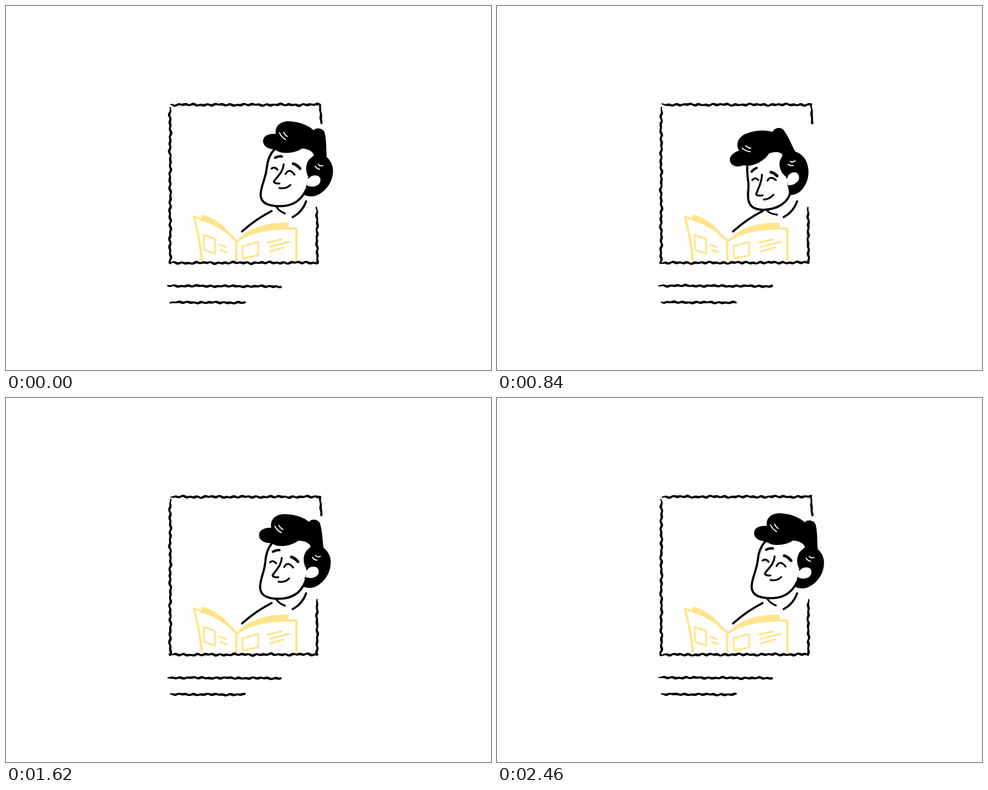
Write an HTML page with a canvas that moves like this. It is 800x600 px and loops after 2.52 s.

```html
<!DOCTYPE html>
<html lang="en">
<head>
<meta charset="utf-8">
<title>Reading</title>
<style>
html, body { margin: 0; width: 100%; height: 100%; overflow: hidden; background: #fefefe; }
canvas { display: block; width: 800px; height: 600px; }
</style>
</head>
<body>
<canvas id="stage" width="800" height="600"></canvas>
<script>
const ctx = document.getElementById('stage').getContext('2d');
const LOOP = 2520, PAPER = '#fefefe', INK = '#000', GOLD = '#ffe48c';
const PIVOT = [488, 334], TILT = -23.5 * Math.PI / 180;

// Hand-drawn border strokes: x1, y1, x2, y2, wobble
const BORDER = [
  [272, 163, 518, 163, 1],
  [518, 163, 520, 193, .4],
  [271, 167, 271, 424, 1],
  [513, 332, 513.5, 423, .8],
  [269, 423.5, 513, 423, 1],
  [267, 461, 453, 462, .8],
  [271, 488.5, 394, 489, .8]
];

const BOOK_FILL = new Path2D(
  'M322 344 C342 348 356 357 381 387 C362 370 346 360 322 354 Z ' +
  'M381 387 C400 365 430 357 466 357 L466 366 C432 366 410 370 381 387 Z');
const BOOK_LINES = new Path2D(
  'M323 420 C321 395 316 370 310 347.5 L324 352 C346 359 364 371 380 387.5 L379.5 420 ' +
  'M381 387.5 C402 371 440 365 479 367 L479 420');
const BOOK_PRINT = new Path2D(
  'M326 377 L345 384 L345 408 L327 402 Z M352 393 L363 398 M354 402 L365 406 ' +
  'M390 396 L416 389 L416 411 L391 416 Z ' +
  'M432 390 L454 385 M435 397 L467 389 M435 405 L458 398');
const SHOULDERS = new Path2D('M389.5 371.5 Q411 352 438 338 M495 322 C491 334 484 342 473 348');

const HAIR = new Path2D(
  'M441 236 C432 236 424 230 424 223 C424 214 433 210 445 211 ' +
  'C443 199 452 189 468 190 C486 191 500 198 508 205 C510 201 520 200 525 207 ' +
  'C529 219 528 238 529 249 C537 256 541 267 539 277 C537 295 523 309 510 313 ' +
  'C502 315 494 313 492 311 L495 298 L500 283 C494 276 493 262 500 253 L508 246 ' +
  'C506 239 497 235 488 235 C480 241 464 244 452 241 Z');
const EAR = new Path2D('M499 283 C503 276 520 275 520 287 C520 299 505 301 496 297');
const SHINE = new Path2D(
  'M451 209 Q454 216 461 220 M458 208 Q460 213 464 215 ' +
  'M510 264 Q512 268 517 269 M515 261 Q518 265 523 263');

// Upright and bowed control points of the parts that bend with the face
const JAW = [
  [442, 237, 434, 246, 431, 256, 430, 268, 428, 285, 420, 298, 420, 311,
   420, 325, 432, 330, 452, 330, 476, 330, 488, 318, 495, 303],
  [413, 262, 412, 270, 413, 278, 414, 287, 416, 296, 414, 303, 414, 312,
   414, 329, 422, 336, 440, 336, 463, 335, 481, 324, 484, 306]
];
const NOSE = [
  [458, 261, 457, 275, 446, 282, 442, 289, 442, 292, 446, 293, 451, 292.5],
  [437, 278, 437, 292, 430, 302, 427.5, 310, 428, 313, 433, 313, 438, 312]
];
const MARKS = [
  { width: 4, from: [444, 250, 449, 247, 455, 248], to: [420, 273, 423, 269, 428, 267] },
  { width: 4.8, from: [474, 260, 479, 261, 485, 268], to: [452, 274, 457, 275, 462, 280] },
  { width: 3, from: [438, 268, 443, 264, 448, 270], to: [421, 287, 426, 281, 431, 287] },
  { width: 3, from: [461, 277, 467, 266, 476, 278], to: [446, 288, 451, 279, 460, 287] },
  { width: 3, from: [451, 300, 462, 302, 469, 295], to: [440, 319, 449, 319, 456, 311] },
  { width: 3, from: [446, 331, 450, 338, 460, 342], to: [445, 337, 451, 343, 462, 344] }
];

const clamp = v => Math.min(1, Math.max(0, v));
const ease = v => v < .5 ? 4 * v ** 3 : 1 - (2 - 2 * v) ** 3 / 2;
const tween = (t, start, end, a, b) => a + (b - a) * ease(clamp((t - start) / (end - start)));

function random(seed) {
  const v = Math.sin(seed * 127.1 + 11.7) * 43758.5453;
  return v - Math.floor(v);
}

// Nods with a slight overshoot, rests, then looks up again
function bowAt(t) {
  if (t < 300) return tween(t, 40, 300, 0, 1.085);
  if (t < 1380) return tween(t, 300, 660, 1.085, 1);
  return tween(t, 1380, 1740, 1, 0);
}

function stroke(path, width, color = INK) {
  ctx.lineWidth = width;
  ctx.strokeStyle = color;
  ctx.stroke(path);
}

function fill(path, color) {
  ctx.fillStyle = color;
  ctx.fill(path);
}

function morph([from, to], bow, cubic) {
  const p = from.map((v, i) => v + (to[i] - v) * bow);
  const path = new Path2D();
  path.moveTo(p[0], p[1]);
  if (!cubic) path.quadraticCurveTo(...p.slice(2));
  else for (let i = 2; i < p.length; i += 6) path.bezierCurveTo(...p.slice(i, i + 6));
  return path;
}

function sketchLine([x1, y1, x2, y2, amount], seed) {
  const length = Math.hypot(x2 - x1, y2 - y1);
  const nx = (y1 - y2) / length, ny = (x2 - x1) / length;
  const phase = [0, 1, 2].map(k => random(seed + k * 3.3) * 6.28);
  const shift = (random(seed + 17) - .5) * .8;
  const point = d => {
    const w = amount * (.75 * Math.sin(d * .52 + phase[0]) +
      .5 * Math.sin(d * .31 + phase[1]) + .5 * Math.sin(d * .12 + phase[2]) + shift);
    const k = d / length;
    return [x1 + (x2 - x1) * k + nx * w, y1 + (y2 - y1) * k + ny * w];
  };
  ctx.strokeStyle = INK;
  for (let d = 0; d < length; d += 2) {
    ctx.lineWidth = 3.5 + .5 * Math.sin(d * .4 + phase[1]) - 1.3 * clamp(1 - d / 12);
    ctx.beginPath();
    ctx.moveTo(...point(d));
    ctx.lineTo(...point(Math.min(length, d + 2)));
    ctx.stroke();
  }
}

function drawBook() {
  fill(BOOK_FILL, GOLD);
  ctx.lineCap = 'butt';
  stroke(BOOK_LINES, 3.8, GOLD);
  ctx.lineCap = 'round';
  stroke(BOOK_PRINT, 3, GOLD);
}

function drawHead(bow) {
  const jaw = morph(JAW, bow, true);
  fill(jaw, PAPER);
  stroke(jaw, 3.6);
  stroke(morph(NOSE, bow, true), 3.2);
  for (const m of MARKS) stroke(morph([m.from, m.to], bow), m.width);

  ctx.save();
  ctx.translate(...PIVOT);
  ctx.rotate(TILT * bow);
  ctx.translate(-PIVOT[0], -PIVOT[1]);
  fill(HAIR, INK);
  fill(EAR, PAPER);
  stroke(EAR, 2.6);
  stroke(SHINE, 1.8, PAPER);
  ctx.restore();
}

function draw(time) {
  const pace = time < 60 || time >= 1620 ? 60 : 30;
  const t = Math.floor(time / pace) * pace;
  ctx.fillStyle = PAPER;
  ctx.fillRect(0, 0, 800, 600);
  ctx.lineCap = ctx.lineJoin = 'round';
  drawBook();
  stroke(SHOULDERS, 3.6);
  BORDER.forEach((line, i) => sketchLine(line, t / 30 + i * 101));
  drawHead(bowAt(t));
}

const start = performance.now();
function tick() {
  draw((performance.now() - start) % LOOP);
  requestAnimationFrame(tick);
}
tick();
</script>
</body>
</html>
```
